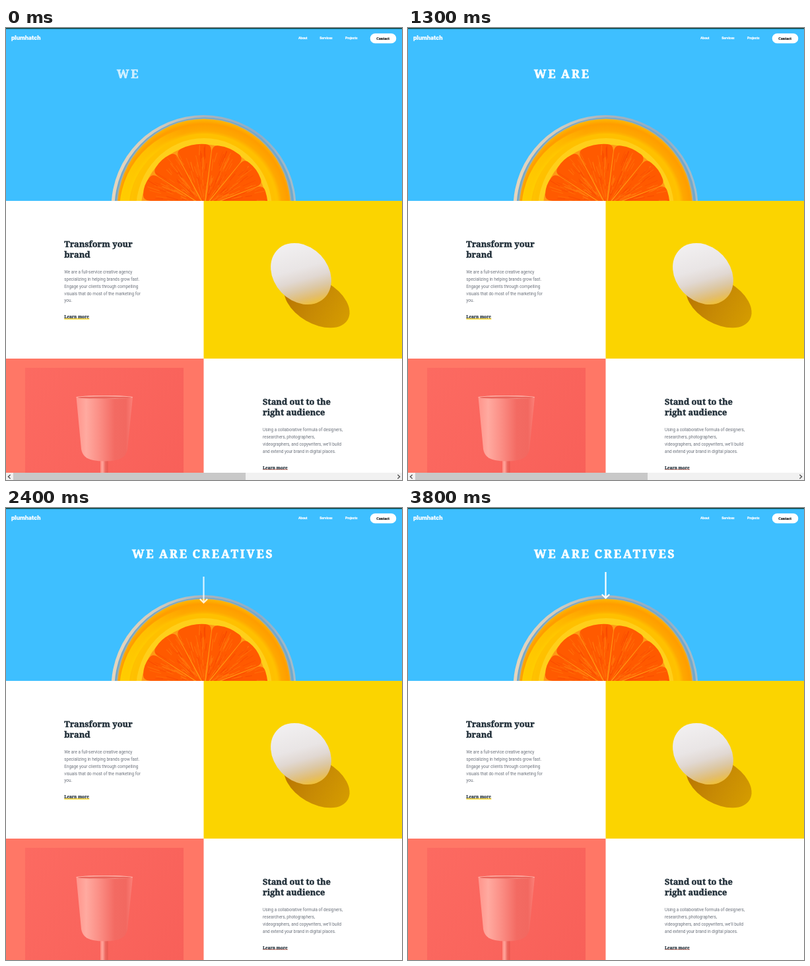
An HTML page with a canvas that plays this animation: 600 by 685 pixels, repeating every 4 s.

```html
<!DOCTYPE html>
<html lang="en">
<head>
<meta charset="utf-8">
<title>Creative agency landing page</title>
<style>
  html, body { margin: 0; width: 100%; height: 100%; overflow: hidden; background: #fff; }
  canvas { display: block; }
</style>
</head>
<body>
<canvas id="stage" width="600" height="685"></canvas>
<script>
const W = 600, H = 685, LOOP = 4000;
const SKY_END = 262, ROW_END = 501, MID = 299.5;
const stage = document.getElementById('stage').getContext('2d');
const page = document.createElement('canvas');
page.width = W;
page.height = H;
const g = page.getContext('2d');
const SERIF = '"Noto Serif", serif', SANS = 'Roboto, sans-serif';
const INK = '#22303a', GREY = '#6c727c';

let seed = 11;
const random = () => (seed = (seed * 16807) % 2147483647) / 2147483647;

function rect(x, y, w, h, fill) {
  g.fillStyle = fill;
  g.fillRect(x, y, w, h);
}

function ellipse(x, y, rx, ry, fill, angle = 0) {
  g.beginPath();
  g.ellipse(x, y, rx, ry, angle * Math.PI / 180, 0, Math.PI * 2);
  g.fillStyle = fill;
  g.fill();
}

function shade(gradient, ...stops) {
  stops.forEach(([at, color]) => gradient.addColorStop(at, color));
  return gradient;
}

// A thin outline gives the display face its heavy weight.
function text(ctx, str, x, y, font, fill, outline = 0) {
  ctx.font = font;
  ctx.fillStyle = ctx.strokeStyle = fill;
  ctx.fillText(str, x, y);
  if (outline) {
    ctx.lineWidth = outline;
    ctx.strokeText(str, x, y);
  }
}

function polar(cx, cy, r, deg) {
  const a = deg * Math.PI / 180;
  return [cx + r * Math.cos(a), cy - r * Math.sin(a)];
}

// One rounded wedge of fruit flesh with pale fibres.
function wedge(cx, cy, from, to) {
  const at = (r, deg) => polar(cx, cy, r, deg);
  g.save();
  g.beginPath();
  g.moveTo(...at(3, (from + to) / 2));
  g.lineTo(...at(84, from));
  g.quadraticCurveTo(...at(95, from), ...at(95, from + 6));
  g.quadraticCurveTo(...at(98, (from + to) / 2), ...at(95, to - 6));
  g.quadraticCurveTo(...at(95, to), ...at(84, to));
  g.closePath();
  g.fillStyle = '#ff5a00';
  g.fill();
  g.clip();
  for (let i = 0; i < 40; i++) {
    const deg = from + random() * (to - from);
    const r = 8 + random() * 72;
    g.beginPath();
    g.moveTo(...at(r, deg));
    g.lineTo(...at(r + 8 + random() * 14, deg + random() * 3 - 1.5));
    g.strokeStyle = random() < 0.6 ? 'rgba(255,136,20,.5)' : 'rgba(245,66,0,.5)';
    g.lineWidth = 0.6 + random() * 0.9;
    g.stroke();
  }
  g.restore();
}

function drawOrange() {
  g.save();
  g.beginPath();
  g.rect(0, 0, W, SKY_END);
  g.clip();
  ellipse(299.5, 272, 140, 140, shade(g.createLinearGradient(160, 0, 440, 0),
    [0, '#e5d5bd'], [0.25, '#d2cbbd'], [0.5, '#a9b3bc'], [0.8, '#8eacc5'], [1, '#a6bdca']));
  ellipse(300.5, 272.5, 136, 137, '#6fa9cf');
  ellipse(300, 272.5, 133, 135.5, '#a9adA0');
  ellipse(300, 272.5, 131, 134.5, shade(g.createRadialGradient(300, 276, 95, 300, 273, 134),
    [0, '#ffd000'], [0.45, '#ffc000'], [0.6, '#ffa800'], [0.85, '#ff9d00'], [1, '#ffb400']));
  g.beginPath();
  g.arc(299, 276, 120, Math.PI * 0.96, Math.PI * 1.45);
  g.strokeStyle = shade(g.createLinearGradient(175, 0, 270, 0),
    [0, 'rgba(255,212,0,.85)'], [0.5, 'rgba(255,206,0,.6)'], [1, 'rgba(255,200,0,0)']);
  g.lineWidth = 14;
  g.stroke();
  ellipse(300, 274, 109, 114, '#ffc000');
  ellipse(300, 275, 103, 108, '#ffcf1a');
  ellipse(300, 272, 95, 95.5, '#ff9a14');
  const edges = [-14, 21, 51, 83, 118, 147, 174, 198];
  for (let i = 1; i < edges.length; i++) wedge(301, 271, edges[i - 1] + 0.3, edges[i] - 0.3);
  g.restore();
}

function drawEgg() {
  rect(MID, SKY_END, W - MID, ROW_END - SKY_END, '#fbd400');
  ellipse(471, 415, 54, 33, shade(g.createLinearGradient(430, 390, 515, 445),
    [0, '#b87400'], [0.5, '#c78a04'], [1, '#d49b00']), 30);
  ellipse(447, 372.5, 51, 41, shade(g.createLinearGradient(434, 328, 460, 420),
    [0, '#f1eff0'], [0.4, '#e9e5e5'], [0.58, '#e1d8d2'], [0.74, '#dcc8a6'],
    [0.88, '#e2bd70'], [1, '#efc038']), 47);
}

function drawGoblet() {
  rect(0, ROW_END, MID, H - ROW_END, '#ff7766');
  rect(29, 515, 240, 170, shade(g.createLinearGradient(29, 515, 269, 685),
    [0, '#fc6a61'], [0.5, '#fa655d'], [1, '#f86059']));
  rect(143, 650, 11.5, 35, shade(g.createLinearGradient(143, 0, 154.5, 0),
    [0, '#ff8a81'], [0.3, '#ffa49a'], [0.65, '#ee6860'], [1, '#e8584f']));
  g.beginPath();
  g.moveTo(106.5, 559.5);
  g.lineTo(114, 638);
  g.quadraticCurveTo(116, 652, 132, 655);
  g.quadraticCurveTo(149, 658, 166, 655);
  g.quadraticCurveTo(182, 652, 184, 638);
  g.lineTo(192, 559.5);
  g.closePath();
  g.fillStyle = shade(g.createLinearGradient(106, 0, 192, 0),
    [0, '#ff938a'], [0.18, '#ffaaa0'], [0.42, '#fb8d84'], [0.68, '#f36b63'],
    [0.88, '#f26860'], [1, '#fb8078']);
  g.fill();
  ellipse(149.2, 559.5, 43, 2.6, '#ffb3a9');
  ellipse(149.2, 560, 41, 1.7, '#e9645c');
}

function drawCopy(x, top, heading, lines, underline) {
  heading.forEach((s, i) => text(g, s, x, top + i * 16.4, 'bold 12.8px ' + SERIF, INK, 0.5));
  lines.forEach((s, i) => text(g, s, x, top + 40.2 + i * 10.8, '6.4px ' + SANS, GREY));
  const base = top + 40.4 + lines.length * 10.8 + 14;
  rect(x, base - 0.6, 38, 2, underline);
  text(g, 'Learn more', x, base, 'bold 6.3px ' + SERIF, INK, 0.2);
}

function drawPage() {
  rect(0, 0, W, H, '#fff');
  rect(0, 0, W, SKY_END, '#3ebfff');
  rect(0, 0, W, 1.4, '#0b3d36');
  drawOrange();
  drawEgg();
  drawGoblet();

  text(g, 'plumhatch', 8, 17.7, '800 8.4px Inter, sans-serif', '#fff', 0.2);
  [['About', 443], ['Services', 475.3], ['Projects', 514]].forEach(([label, x]) =>
    text(g, label, x, 17.3, 'bold 5px ' + SANS, '#fff', 0.2));
  g.beginPath();
  g.roundRect(551.7, 8.2, 39.6, 15, 7.5);
  g.fillStyle = '#fff';
  g.fill();
  text(g, 'Contact', 561.3, 17.5, 'bold 5.1px ' + SERIF, '#111', 0.2);

  drawCopy(88.3, 332, ['Transform your', 'brand'], [
    'We are a full-service creative agency',
    'specializing in helping brands grow fast.',
    'Engage your clients through compelling',
    'visuals that do most of the marketing for',
    'you.'
  ], '#fad94a');
  drawCopy(389, 571, ['Stand out to the', 'right audience'], [
    'Using a collaborative formula of designers,',
    'researchers, photographers,',
    'videographers, and copywriters, we\u2019ll build',
    'and extend your brand in digital places.'
  ], '#f5b9b0');
}

// cubic-bezier(.25, .1, .25, 1)
function ease(x) {
  if (x <= 0) return 0;
  if (x >= 1) return 1;
  const curve = (a, b, u) => 3 * a * u * (1 - u) ** 2 + 3 * b * u * u * (1 - u) + u ** 3;
  let lo = 0, hi = 1;
  for (let i = 0; i < 24; i++) {
    const mid = (lo + hi) / 2;
    if (curve(0.25, 0.25, mid) < x) lo = mid; else hi = mid;
  }
  return curve(0.1, 1, lo);
}

const words = [
  { str: 'WE', x: 191, dx: -80, dy: 0, start: -336, time: 800 },
  { str: 'ARE', x: 232, dx: 0, dy: -78, start: 360, time: 800 },
  { str: 'CREATIVES', x: 282.5, dx: 325, dy: 0, start: 1330, time: 600 }
];

function drawArrow(p) {
  const y = 40 * (1 - p);
  stage.globalAlpha = p;
  stage.strokeStyle = '#fff';
  stage.lineWidth = 2.2;
  stage.beginPath();
  stage.moveTo(299.5, 97 + y);
  stage.lineTo(299.5, 136 + y);
  stage.moveTo(293.8, 131 + y);
  stage.lineTo(299.5, 136.5 + y);
  stage.lineTo(305.2, 131 + y);
  stage.stroke();
  stage.globalAlpha = 1;
}

function drawScrollbar(overflow) {
  if (overflow < 1) return;
  stage.fillStyle = '#f1f1f1';
  stage.fillRect(0, 674, W, 11);
  stage.fillStyle = '#c8c8c8';
  stage.fillRect(11, 674, 578 * W / (W + overflow), 11);
  stage.strokeStyle = '#555';
  stage.lineWidth = 1.4;
  [[4, 1], [596, -1]].forEach(([x, dir]) => {
    stage.beginPath();
    stage.moveTo(x + 2.6 * dir, 676.9);
    stage.lineTo(x - 0.6 * dir, 680);
    stage.lineTo(x + 2.6 * dir, 683.1);
    stage.stroke();
  });
}

function render(t) {
  stage.drawImage(page, 0, 0);
  stage.letterSpacing = '2.8px';
  for (const w of words) {
    const p = ease((t - w.start) / w.time);
    stage.globalAlpha = p;
    text(stage, w.str, w.x + w.dx * (1 - p), 76.3 + w.dy * (1 - p),
      'bold 17.3px ' + SERIF, '#fff', 0.7);
  }
  stage.globalAlpha = 1;
  drawArrow(ease((t - 1980) / 800));
  const last = words[2];
  const offset = last.dx * (1 - ease((t - last.start) / last.time));
  drawScrollbar(Math.min(385, offset * 1.94));
}

drawPage();
const begin = performance.now();
function tick() {
  render((performance.now() - begin) % LOOP);
  requestAnimationFrame(tick);
}
tick();
</script>
</body>
</html>
```
